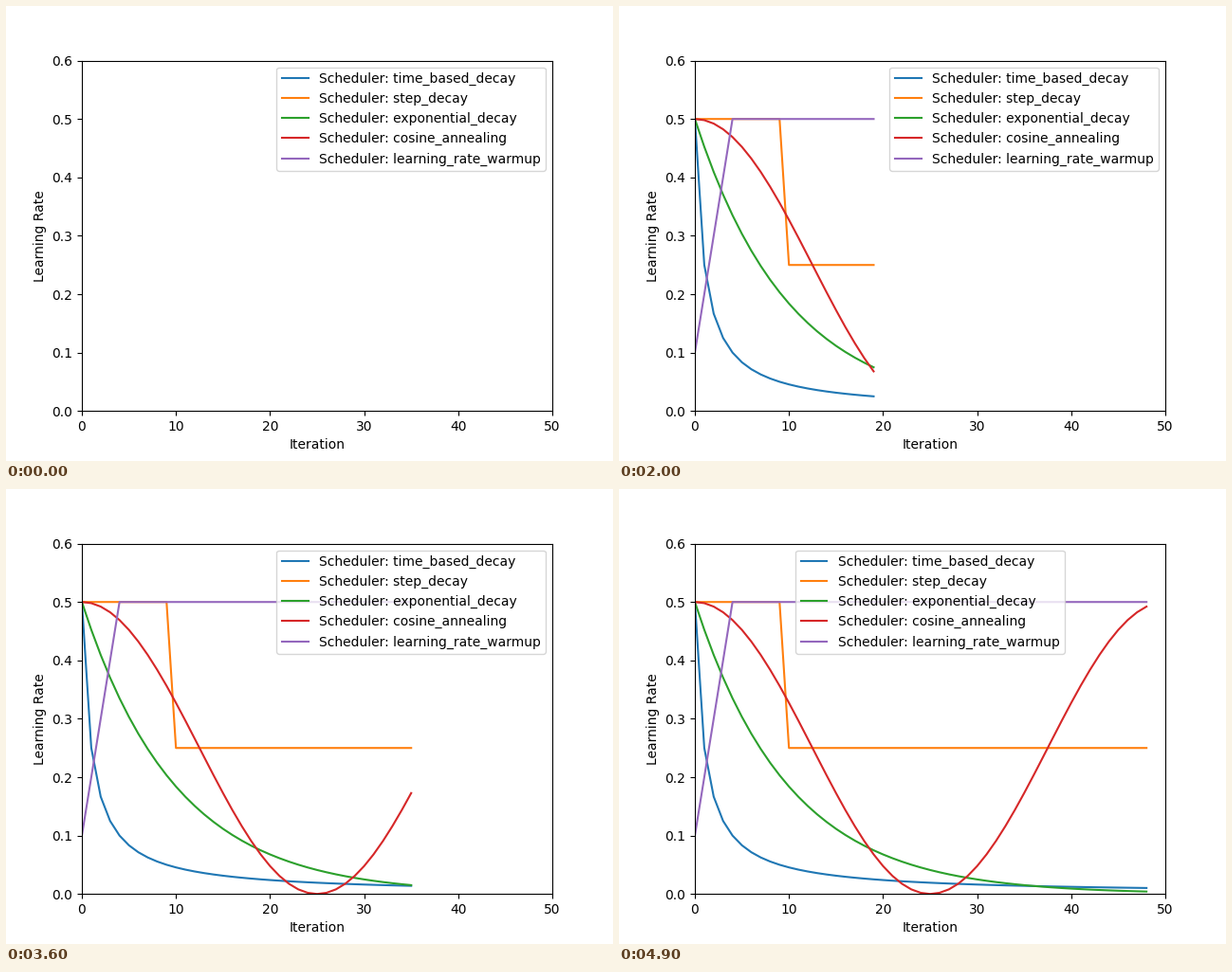
A matplotlib script that plays this animation: 640 px wide and 480 px high, repeating every 5 s.

```python
import numpy as np
import matplotlib.pyplot as plt
from matplotlib.animation import FuncAnimation

STEPS = 50
BASE = 0.5

it = np.arange(STEPS)
schedules = {
    "time_based_decay": BASE / (1 + it),
    "step_decay": np.where(it < 10, BASE, BASE / 2),
    "exponential_decay": BASE * np.exp(-0.1 * it),
    "cosine_annealing": BASE / 2 * (1 + np.cos(2 * np.pi * it / STEPS)),
    "learning_rate_warmup": BASE * np.minimum((it + 1) / 5, 1),
}

fig, ax = plt.subplots(figsize=(6.4, 4.8), dpi=100)
ax.set_xlim(0, STEPS)
ax.set_ylim(0, 0.6)
ax.set_xlabel("Iteration")
ax.set_ylabel("Learning Rate")

lines = [ax.plot([], [], label=f"Scheduler: {name}")[0] for name in schedules]
# "best" lets the legend move away once the curves crowd its corner
ax.legend(loc="best")


def update(n):
    for line, rates in zip(lines, schedules.values()):
        line.set_data(it[:n], rates[:n])
    return lines


anim = FuncAnimation(fig, update, frames=STEPS, interval=100,
                     repeat=True, repeat_delay=0, blit=False)
plt.show()
```
